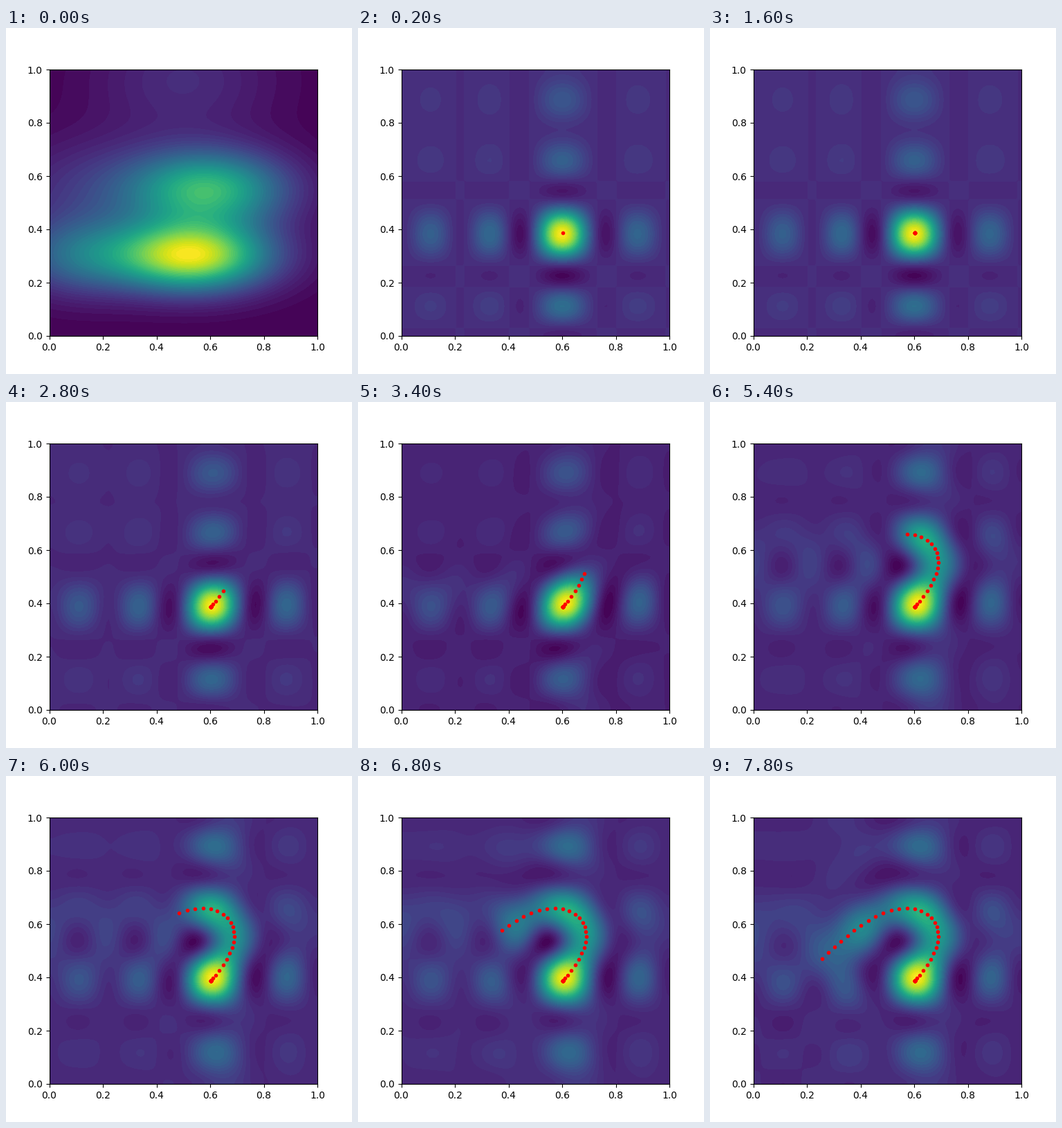
These frames come from a looping animation (500x500 px, 8 s). A matplotlib script:

```python
import numpy as np
import matplotlib.pyplot as plt
from matplotlib.animation import FuncAnimation

FRAMES, STEP_MS = 40, 200
MODES = 10
SUBSTEPS = 8
START = (0.602, 0.386)

# Gaussian bumps of the opening density: weight, centre x, y, widths x, y
BUMPS = [
    (0.90, 0.53, 0.30, 0.20, 0.09),
    (0.30, 0.11, 0.30, 0.17, 0.10),
    (0.60, 0.60, 0.55, 0.20, 0.10),
    (0.15, 0.20, 0.55, 0.25, 0.13),
    (0.12, 0.50, 0.96, 0.23, 0.16),
]

axis = np.linspace(0, 1, 100)
gx, gy = np.meshgrid(axis, axis)


def logistic(u):
    return 1 / (1 + np.exp(-u))


def bell(u):
    return np.exp(-u ** 2 / 2)


def walk():
    """Start from rest, slow down through one left turn, then run straight."""
    t = (np.arange((FRAMES - 1) * SUBSTEPS) + 0.5) / SUBSTEPS
    speed = 0.0319 * logistic(t - 11.5) - 0.0137 * bell((t - 20.3) / 3.8)
    speed = np.maximum(speed, 0) / SUBSTEPS
    angle = np.radians(44 + 182 * logistic((t - 23.2) / 3.6))
    moves = np.column_stack([speed * np.cos(angle), speed * np.sin(angle)])
    return np.array(START) + np.vstack([np.zeros(2), moves.cumsum(axis=0)])


def cosines(v):
    return np.cos(np.pi * np.outer(v, np.arange(MODES)))


def opening_density():
    z = sum(w * bell((gx - cx) / sx) * bell((gy - cy) / sy)
            for w, cx, cy, sx, sy in BUMPS)
    return 0.979 * z / z.max()


def visit_density(step):
    """Truncated cosine series of the time spent along the path."""
    pts = path[:step * SUBSTEPS + 1]
    coef = cosines(pts[:, 1]).T @ cosines(pts[:, 0]) / len(pts)
    modes = cosines(axis)
    return modes @ coef @ modes.T


path = walk()
fig, ax = plt.subplots(figsize=(5, 5), dpi=100)


def draw(step):
    ax.clear()
    z = visit_density(step) if step else opening_density()
    ax.contourf(gx, gy, z, levels=50, cmap="viridis")
    if step:
        dots = path[SUBSTEPS:step * SUBSTEPS + 1:SUBSTEPS]
        ax.plot(dots[:, 0], dots[:, 1], "r.", markersize=6)
    ax.set_xlim(0, 1)
    ax.set_ylim(0, 1)
    return []


anim = FuncAnimation(fig, draw, frames=FRAMES, interval=STEP_MS,
                     init_func=lambda: draw(0), repeat=True, repeat_delay=0)
plt.show()
```
